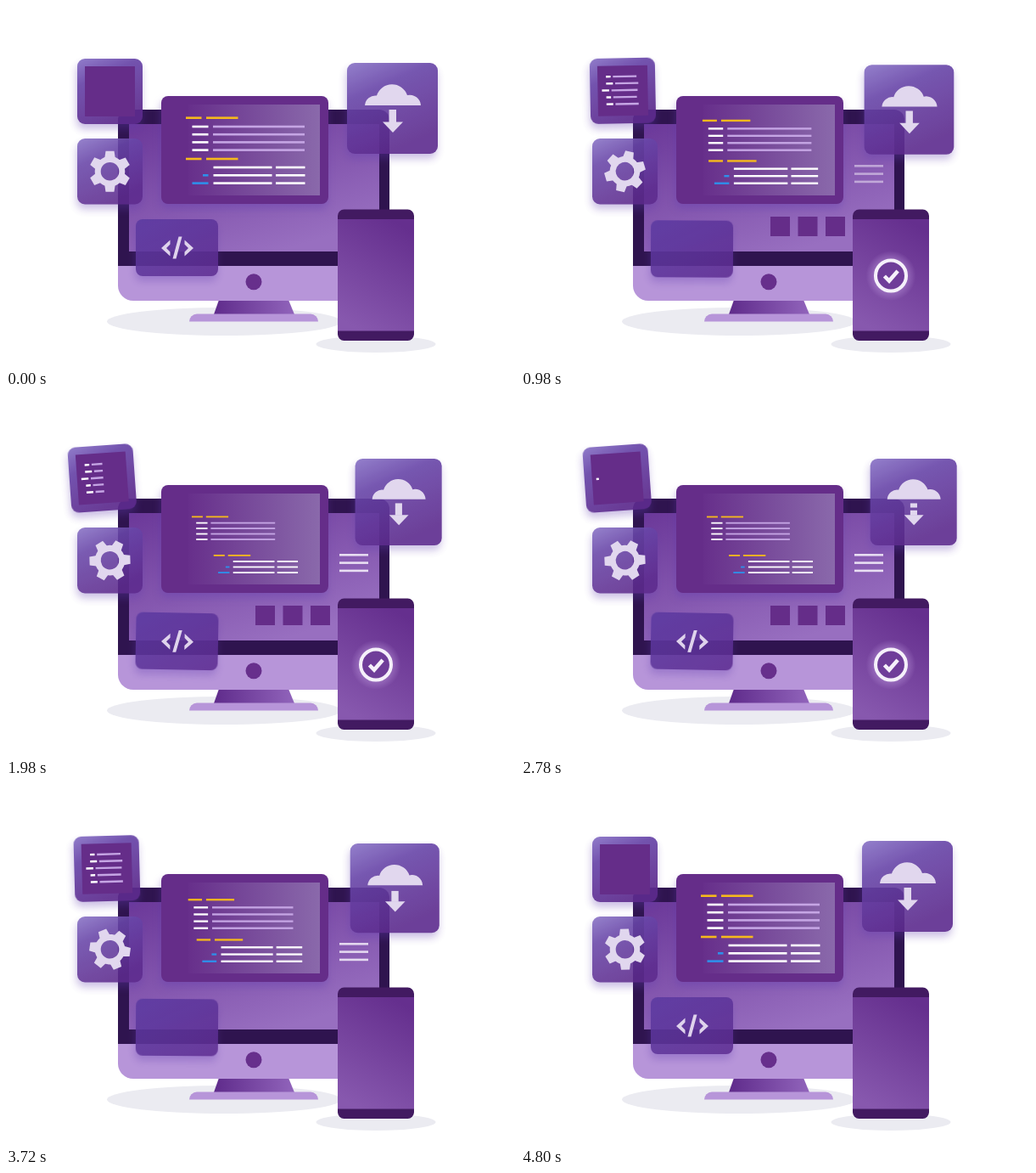
Recreate the animation shown at these times as an HTML page. Size 600x425 px, loop 4.82 s.

```html
<!DOCTYPE html>
<html lang="en">
<head>
<meta charset="utf-8">
<title>Devices</title>
<style>
html, body { margin: 0; width: 100%; height: 100%; overflow: hidden; background: #fff; }
svg { display: block; width: 600px; height: 425px; }
.card { filter: drop-shadow(-1px 6px 5px rgba(98, 62, 175, .36)); }
.icon { fill: #e1d7ee; }
.deep { fill: #652d89; }
</style>
</head>
<body>
<svg viewBox="0 0 600 425">
  <defs>
    <linearGradient id="cardFill" x1="0" y1="0" x2=".45" y2="1">
      <stop offset="0" stop-color="#8872c6"/>
      <stop offset=".35" stop-color="#6845a8"/>
      <stop offset="1" stop-color="#5d2b8e"/>
    </linearGradient>
    <linearGradient id="flatFill" x1="0" y1="0" x2="1" y2="1">
      <stop offset="0" stop-color="#5c3ba2"/>
      <stop offset="1" stop-color="#5e2d92"/>
    </linearGradient>
    <linearGradient id="screenFill" x1="0" y1="0" x2=".6" y2="1">
      <stop offset="0" stop-color="#6b3899"/>
      <stop offset="1" stop-color="#986fc0"/>
    </linearGradient>
    <linearGradient id="panelFill">
      <stop offset="0" stop-color="#672f8b"/>
      <stop offset="1" stop-color="#8a69ab"/>
    </linearGradient>
    <linearGradient id="phoneFill" x1=".7" y1="0" x2=".3" y2="1">
      <stop offset="0" stop-color="#652f8e"/>
      <stop offset="1" stop-color="#8758ae"/>
    </linearGradient>
    <linearGradient id="standFill">
      <stop offset="0" stop-color="#5f2b8b"/>
      <stop offset="1" stop-color="#9164bb"/>
    </linearGradient>
    <radialGradient id="glowFill">
      <stop offset=".45" stop-color="#d9b8f5" stop-opacity=".5"/>
      <stop offset="1" stop-color="#d9b8f5" stop-opacity="0"/>
    </radialGradient>
    <clipPath id="wipeClip"><rect id="wipe" x="97" y="76" width="0" height="48"/></clipPath>
  </defs>

  <ellipse cx="257" cy="371.5" rx="138" ry="16.5" fill="#ebebf1"/>
  <ellipse cx="436" cy="398" rx="70.5" ry="10" fill="#ebebf1"/>

  <!-- monitor -->
  <path d="M251 346H333L340 363H245Z" fill="url(#standFill)"/>
  <path d="M216 371.5A9 9 0 0 1 225 362.5H359A9 9 0 0 1 368 371.5Z" fill="#b795d9"/>
  <path d="M132 306H452V347H150A18 18 0 0 1 132 329Z" fill="#b795d9"/>
  <path d="M132 306V134A12 12 0 0 1 144 122H440A12 12 0 0 1 452 134V306Z" fill="#2f144f"/>
  <rect x="145" y="139" width="295" height="150" fill="url(#screenFill)"/>
  <circle cx="292" cy="324.700" r="9.500" fill="#672f8c"/>
  <g id="tiles" class="deep">
    <rect x="294" y="248" width="23" height="23"/>
    <rect x="326.500" y="248" width="23" height="23"/>
    <rect x="359" y="248" width="23" height="23"/>
  </g>
  <g id="menu" fill="#e9dff3"></g>

  <!-- editor window -->
  <rect class="card deep" x="183" y="106" width="197" height="127" rx="8"/>
  <rect x="215" y="116" width="155" height="107" fill="url(#panelFill)"/>
  <g id="upper"></g>
  <g id="lower"></g>

  <!-- phone -->
  <rect x="391" y="239.500" width="90" height="154.500" rx="7.500" fill="#421a61"/>
  <rect x="391" y="251" width="90" height="131.500" fill="url(#phoneFill)"/>
  <g id="check">
    <circle r="29" fill="url(#glowFill)"/>
    <circle r="17.800" fill="#6f3d99" stroke="#f5f0fa" stroke-width="4"/>
    <path d="M-7.500 .500L-2 6L8 -5.500" fill="none" stroke="#f5f0fa" stroke-width="4.500"/>
  </g>

  <!-- floating cards -->
  <g id="list">
    <rect class="card" x="84" y="62" width="77" height="77" rx="9" fill="url(#cardFill)" opacity=".92"/>
    <rect class="deep" x="93" y="71" width="59" height="59"/>
    <g id="rows" clip-path="url(#wipeClip)"></g>
  </g>
  <rect class="card" x="84" y="156" width="77" height="77.500" rx="9" fill="url(#cardFill)" opacity=".88"/>
  <g id="gear" class="icon"></g>
  <g id="tag">
    <rect class="card" x="153" y="251" width="97" height="67" rx="8" fill="url(#flatFill)" opacity=".88"/>
    <g id="tagIcon" fill="#dfd3ec">
      <path id="angle" d="M183 285L193.500 275.500V280.500L189 285L193.500 289.500V294.500Z"/>
      <use href="#angle" transform="matrix(-1 0 0 1 404 0)"/>
      <path d="M203.500 271.500H207.500L200.500 297.500H196.500Z"/>
    </g>
  </g>
  <g id="cloud">
    <rect class="card" x="402" y="67" width="107" height="107" rx="9" fill="url(#cardFill)" opacity=".9"/>
    <g class="icon">
      <path d="M423 117A12.500 12.500 0 0 1 437 105.500A19 19 0 0 1 473 105A13 13 0 0 1 489 117Z"/>
      <rect id="stemTop" x="451.500" y="122" width="8.500"/>
      <rect id="stemLow" x="451.500" width="8.500"/>
      <path d="M444 136.500H468L456 149Z"/>
    </g>
  </g>
</svg>
<script>
const LOOP = 4820, HALF = LOOP / 2, QUARTER = LOOP / 4;
const $ = id => document.getElementById(id);
const clamp = v => Math.min(1, Math.max(0, v));
const ramp = (t, a, b) => clamp((t - a) / (b - a));
const ease = p => p < .5 ? 4 * p ** 3 : 1 - 4 * (1 - p) ** 3;
const smooth = p => p * p * (3 - 2 * p);
const mix = (a, b, p) => a + (b - a) * p;
const set = (id, name, v) => $(id).setAttribute(name, v);

function add(parent, tag, attrs) {
  const el = document.createElementNS('http://www.w3.org/2000/svg', tag);
  for (const k in attrs) el.setAttribute(k, attrs[k]);
  $(parent).append(el);
}
function bar(parent, x1, x2, y, fill, h = 2.6) {
  add(parent, 'rect', { x: x1, y: y - h / 2, width: x2 - x1, height: h, ...(fill && { fill }) });
}

const YELLOW = '#f6b91c', WHITE = '#fff', LILAC = '#c5a5e4', BLUE = '#2e8fea';

for (const [id, y] of [['upper', 131.7], ['lower', 180]]) {
  bar(id, 212, 230.5, y, YELLOW);
  bar(id, 236, 273.5, y, YELLOW);
}
for (const y of [142, 151.2, 160.4, 169.6]) {
  bar('upper', 219.5, 238.5, y, WHITE);
  bar('upper', 244, 352, y, LILAC);
}
for (const y of [190, 199.3, 208.6]) {
  bar('lower', 244.5, 313.5, y, WHITE);
  bar('lower', 318, 352.5, y, WHITE);
}
bar('lower', 232, 238.5, 199.3, BLUE);
bar('lower', 219.5, 238.5, 208.6, BLUE);
for (const y of [188.3, 197.6, 206.9]) bar('menu', 393, 427, y);

[[103, 5.5], [103, 8], [98, 8.5], [103, 5.5], [103, 8]].forEach(([x, w], i) => {
  const y = 83.6 + i * 8.1;
  bar('rows', x, x + w, y, WHITE, 2.4);
  bar('rows', x + w + 2.7, [139, 141, 140][i % 3], y, LILAC, 2.4);
});

for (let a = 0; a < 360; a += 60)
  add('gear', 'path', { d: 'M-6.5 -14L-5 -24H5L6.5 -14Z', transform: `rotate(${a})` });
add('gear', 'circle', { r: 14.3, fill: 'none', stroke: '#e1d7ee', 'stroke-width': 7 });

// Shrinks a block of code while moving its left end and base line
function shrink(id, p, x, y, dx, dy, s) {
  set(id, 'transform', `translate(${x + dx * p} ${y + dy * p}) scale(${mix(1, s, p)}) translate(${-x} ${-y})`);
}

function checkScale(t) {
  if (t < 550) return mix(.6, 1.16, smooth(ramp(t, 250, 550)));
  if (t < 1200) return mix(1.16, .96, smooth(ramp(t, 550, 1200)));
  return mix(.96, 1.01, smooth(ramp(t, 1200, 1800)));
}

function draw(t) {
  const p = ease(1 - Math.abs(t / HALF - 1));
  const h = t % HALF;

  shrink('upper', p, 212, 169.6, 7.1, .4, .695);
  shrink('lower', p, 212, 208.6, 33.5, .5, .7);

  set('list', 'transform', `translate(${-9.4 * p} ${-2.6 * p}) rotate(${-4.1 * p} 122.5 100.5)`);
  set('tag', 'transform', `translate(0 ${5.5 * p}) rotate(${1.1 * p} 201.5 284.5)`);
  set('cloud', 'transform',
    `translate(${455.5 + 7.3 * p} ${120.5 + 5.6 * p}) scale(${1 - .047 * p}) translate(-455.5 -120.5)`);
  set('gear', 'transform', `translate(122.5 194.7) rotate(${360 * t / LOOP})`);

  const shown = ramp(h, 330, 780) - ramp(h, 1800, 2250);
  set('wipe', 'width', 45 * shown);
  set('tagIcon', 'opacity', 1 - ramp(h, 400, 800) + ramp(h, 1560, 1960));

  // A small gap travels down the arrow's stem
  const gap = 122 + (t % QUARTER - 100) * .026;
  const top = Math.min(137, Math.max(122, gap - 1.7));
  const low = Math.min(137, Math.max(122, gap + 1.7));
  set('stemTop', 'height', top - 122);
  set('stemLow', 'y', low);
  set('stemLow', 'height', 137 - low);

  set('tiles', 'opacity', ramp(t, 200, 550) - ramp(t, 3200, 3700));
  set('menu', 'opacity', ramp(t, 750, 1150) - ramp(t, 3700, 4150));
  set('check', 'opacity', ramp(t, 250, 500) - ramp(t, 3200, 3600));
  set('check', 'transform', `translate(436 317.5) scale(${checkScale(t)})`);
}

const start = performance.now();
function tick() {
  draw((performance.now() - start) % LOOP);
  requestAnimationFrame(tick);
}
tick();
</script>
</body>
</html>
```
